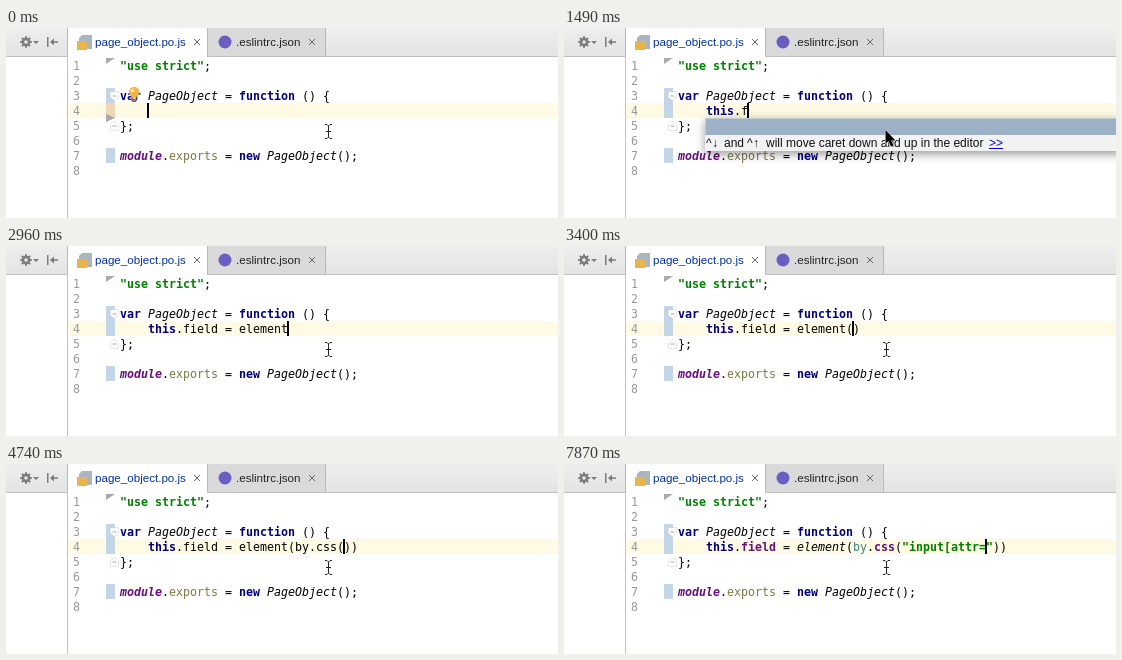
These frames come from a looping animation (552 by 190 pixels, 8000 ms). An HTML page with a canvas:

```html
<!DOCTYPE html>
<html lang="en">
<head>
<meta charset="utf-8">
<title>Editor typing</title>
<style>
html, body { margin: 0; width: 552px; height: 190px; overflow: hidden; background: #fff; }
canvas { display: block; }
</style>
</head>
<body>
<canvas id="stage" width="552" height="190"></canvas>
<script>
const ctx = document.getElementById('stage').getContext('2d');
const LOOP = 8000, CELL = 7, LINE = 15, LEFT = 114, TOP = 30, INDENT = 142;
const MONO = '11.63px "DejaVu Sans Mono", monospace';
const ui = size => size + 'px "Liberation Sans", Arial, sans-serif';

const STYLES = {
  plain: ['', '#000'],
  keyword: ['bold ', '#000080'],
  string: ['bold ', '#008000'],
  italic: ['italic ', '#000'],
  global: ['italic bold ', '#660e7a'],
  member: ['bold ', '#660e7a'],
  olive: ['', '#7a7a43'],
  teal: ['', '#458383']
};

// time, text before the caret, text after it, popup
const STEPS = [
  [0, '', ''],
  [750, 't', ''],
  [900, 'th', '', 'word'],
  [1050, 'thi', '', 'word'],
  [1190, 'this', '', 'word'],
  [1340, 'this.', '', 'empty'],
  [1490, 'this.f', '', 'empty'],
  [1640, 'this.fi', '', 'empty'],
  [1780, 'this.fiel', '', 'empty'],
  [1920, 'this.field', ''],
  [2070, 'this.field ', ''],
  [2220, 'this.field =', ''],
  [2370, 'this.field = ', ''],
  [2520, 'this.field = e', ''],
  [2660, 'this.field = ele', ''],
  [2810, 'this.field = eleme', ''],
  [2960, 'this.field = element', ''],
  [3260, 'this.field = element', '', 'globals'],
  [3400, 'this.field = element(', ')'],
  [3700, 'this.field = element(b', ')'],
  [3850, 'this.field = element(by', ')'],
  [4000, 'this.field = element(by.', ')', 'members'],
  [4150, 'this.field = element(by.c', ')', 'members'],
  [4450, 'this.field = element(by.cs', ')', 'members'],
  [4600, 'this.field = element(by.css', ')', 'members'],
  [4740, 'this.field = element(by.css(', '))']
];
const QUOTED = [
  [5040, ''], [5340, 'i'], [5490, 'in'], [5640, 'inp'], [5940, 'input'],
  [6390, 'input['], [7130, 'input[a'], [7430, 'input[at'], [7580, 'input[att'],
  [7730, 'input[attr'], [7870, 'input[attr=']
];
for (const [time, value] of QUOTED) {
  STEPS.push([time, 'this.field = element(by.css("' + value, '"))']);
}

const MEMBERS = [
  ['m', 'cssContainingText', '(cssSelector: string, searchText: string)', true],
  ['f', 'className', '(className: string)'],
  ['m', 'constructor', '() (WebdriverBy)'],
  ['f', 'css', '(css: string)'],
  ['m', 'deepCss', '(selector: string)', true],
  ['m', 'addLocator', '(name: string, script: Function)', true]
];
const GLOBALS = [
  ['f', 'element', ''], ['f', 'ElementFinder', ''], ['f', 'ElementArrayFinder', ''],
  ['f', 'Element', ''], ['f', 'elementExplorer', ''], ['f', 'ElementHelper', '']
];

function rect(x, y, w, h, color) {
  ctx.fillStyle = color;
  ctx.fillRect(x, y, w, h);
}

function text(value, x, y, font, color) {
  ctx.font = font;
  ctx.fillStyle = color;
  ctx.fillText(value, x, y);
  return x + ctx.measureText(value).width;
}

function shape(points, fill, stroke, closed = true) {
  ctx.beginPath();
  points.forEach(([x, y]) => ctx.lineTo(x, y));
  if (closed) ctx.closePath();
  if (stroke) { ctx.strokeStyle = stroke; ctx.lineWidth = 1; ctx.stroke(); }
  if (fill) { ctx.fillStyle = fill; ctx.fill(); }
}

function disc(x, y, r, color) {
  ctx.beginPath();
  ctx.arc(x, y, r, 0, Math.PI * 2);
  ctx.fillStyle = color;
  ctx.fill();
}

function code(line, x, tokens) {
  const y = TOP + (line - 1) * LINE + 12;
  for (const [value, style] of tokens) {
    const [weight, color] = STYLES[style || 'plain'];
    text(value, x, y, weight + MONO, color);
    x += value.length * CELL;
  }
}

function tokenize(value, resolved) {
  const kinds = { this: 'keyword' };
  if (resolved) Object.assign(kinds, { field: 'member', element: 'italic', by: 'teal', css: 'member' });
  const parts = value.match(/this|field|element|by|css|".*?"|./g) || [];
  return parts.map(part => [part, part[0] === '"' ? 'string' : kinds[part]]);
}

function cross(x, y) {
  shape([[x - 3, y - 3], [x + 3, y + 3]], null, '#666', false);
  shape([[x + 3, y - 3], [x - 3, y + 3]], null, '#666', false);
}

function toolbar() {
  const shade = ctx.createLinearGradient(0, 0, 0, 27);
  shade.addColorStop(0, '#eeeeee');
  shade.addColorStop(1, '#e4e4e4');
  rect(0, 0, 552, 28, shade);

  const grey = '#7c7c7c';
  for (let i = 0; i < 8; i++) {
    const a = i * Math.PI / 4;
    ctx.strokeStyle = grey;
    ctx.lineWidth = 2;
    ctx.beginPath();
    ctx.moveTo(20 + 3 * Math.cos(a), 14 + 3 * Math.sin(a));
    ctx.lineTo(20 + 5.8 * Math.cos(a), 14 + 5.8 * Math.sin(a));
    ctx.stroke();
  }
  disc(20, 14, 4.3, grey);
  disc(20, 14, 1.8, '#e9e9e9');
  shape([[27, 13], [33, 13], [30, 16]], grey);
  rect(41, 9, 1.5, 10, grey);
  rect(46, 13.3, 6, 1.5, grey);
  shape([[44, 14], [48, 10.5], [48, 17.5]], grey);

  rect(61, 0, 140, 28, '#fff');
  rect(201, 0, 118, 28, '#dadada');
  for (const x of [61, 201, 319]) rect(x, 0, 1, 28, '#b8b8b8');
  rect(0, 28, 62, 1, '#c0c0c0');
  rect(201, 28, 351, 1, '#c0c0c0');

  shape([[76, 7], [86, 7], [86, 21], [73, 21], [73, 10]], '#a9b5bf');
  rect(71, 13, 10, 9, '#e8b44c');
  text('page_object.po.js', 89, 18, ui(11.6), '#0032a0');
  cross(191, 14);
  disc(219, 14, 6.5, '#6a5fc0');
  text('.eslintrc.json', 230, 18, ui(11.6), '#222');
  cross(306, 14);
}

function fold(y, up) {
  const d = up ? -1 : 1;
  shape([[104.5, y - 4 * d], [112.5, y - 4 * d], [112.5, y + d], [108.5, y + 4.5 * d], [104.5, y + d]],
    '#fff', '#ccc');
  rect(106.5, y - 0.5, 4, 1, '#aaa');
}

function editor(fresh) {
  rect(61, 28, 1, 162, '#c4c4c4');
  rect(62, 75, 490, LINE, '#fffae3');
  for (let n = 1; n <= 8; n++) text(n, 67, TOP + n * LINE - 3, MONO, '#999');
  rect(100, 60, 9, LINE, '#c3d6e8');
  rect(100, 75, 9, LINE, fresh ? '#f0d6b6' : '#c3d6e8');
  rect(100, 120, 9, LINE, '#c3d6e8');
  shape([[100, 30], [109, 30], [100, 36]], '#aaa');
  if (fresh) shape([[100, 86], [109, 90], [100, 94]], '#aaa');
  fold(68, false);
  fold(98, true);

  code(1, LEFT, [['"use strict"', 'string'], [';']]);
  code(3, LEFT, [['var', 'keyword'], [' '], ['PageObject', 'italic'], [' = '],
    ['function', 'keyword'], [' () {']]);
  code(5, LEFT, [['};']]);
  code(7, LEFT, [['module', 'global'], ['.'], ['exports', 'olive'], [' = '],
    ['new', 'keyword'], [' '], ['PageObject', 'italic'], ['();']]);
}

function bulb() {
  disc(128, 64, 5.2, '#f2b544');
  disc(126.5, 62.5, 2, '#fbdc98');
  rect(125.5, 68, 5, 2.5, '#f2b544');
  rect(125.5, 71, 5, 3, '#777');
}

function panel(x, height, color) {
  ctx.save();
  ctx.shadowColor = 'rgba(0,0,0,.4)';
  ctx.shadowBlur = 9;
  ctx.shadowOffsetY = 3;
  rect(x, 90, 560 - x, height, color);
  ctx.restore();
  rect(x, 90, 552 - x, 18, '#9cb1c6');
  rect(x, 90, 552 - x, 1, '#c3cbd3');
  rect(x, 90, 1, height, '#c3cbd3');
}

function hintPopup(x, typed) {
  panel(x, 33, '#f2f2f2');
  rect(x, 107, 552 - x, 16, '#f2f2f2');
  if (typed) {
    text('this', INDENT, 103, 'bold ' + MONO, '#75808c');
    text(typed, INDENT, 103, 'bold ' + MONO, '#c45ed4');
  }
  const font = ui(12);
  const piece = (value, dx) => text(value, x + dx, 119, font, '#111');
  piece('^', 1);
  piece('↓', 7);
  piece('and', 19);
  piece('^', 42);
  piece('↑', 48);
  piece('will move caret down and up in the editor', 61);
  const end = text('>>', x + 284, 119, font, '#0000e0');
  rect(x + 284, 120, end - x - 284, 1, '#0000e0');
}

function lock(x, y) {
  ctx.strokeStyle = '#9cc89c';
  ctx.lineWidth = 1;
  ctx.beginPath();
  ctx.arc(x - 1, y - 1, 2, Math.PI, 0);
  ctx.stroke();
  rect(x - 1, y - 0.5, 5, 4, '#9cc89c');
}

// A prefix may match the start of a name or one of its capitalised words.
function matchAt(name, prefix) {
  if (name.startsWith(prefix)) return 0;
  return name.indexOf(prefix[0].toUpperCase() + prefix.slice(1));
}

function listPopup(x, textX, rows, prefix, locks) {
  panel(x, Math.min(rows.length * 18, 110), '#ebf4fe');
  rows.forEach(([kind, name, params, bold], i) => {
    const y = 99 + i * 18;
    const font = (bold ? 'bold ' : '') + MONO;
    ctx.globalAlpha = i ? 1 : 0.7;
    disc(x + 10, y, 6.3, kind === 'm' ? '#f0b6c2' : '#f7d79c');
    text(kind, x + 6.5, y + 3.5, MONO, '#9a7070');
    if (locks) lock(x + 25, y);
    ctx.globalAlpha = 1;
    text(name, textX, y + 4, font, bold ? '#484c50' : '#5c5c5c');
    const at = prefix ? matchAt(name, prefix) : -1;
    if (at >= 0) {
      text(name.substr(at, prefix.length), textX + at * CELL, y + 4, font, '#c85cd0');
    }
    text(params, textX + name.length * CELL, y + 4, MONO, '#666');
  });
}

function popup(kind, typed) {
  if (kind === 'word') hintPopup(134, typed);
  if (kind === 'empty') hintPopup(141, '');
  if (kind === 'globals') listPopup(215, 233, GLOBALS, 'element', false);
  if (kind === 'members') {
    const prefix = typed.split('by.')[1];
    const rows = MEMBERS.filter(row => row[1].toLowerCase().includes(prefix));
    listPopup(274, 310, rows, prefix, true);
  }
}

function pointer(arrow) {
  if (arrow) {
    shape([[321.5, 102], [321.5, 116], [324.5, 113], [327, 118.5], [329.5, 117.5],
      [327, 112.5], [331.5, 112.5]], '#000', '#fff');
    return;
  }
  rect(322, 98, 1, 11, '#222');
  rect(320, 103, 5, 1, '#222');
  for (const [y, d] of [[96.5, 1.5], [110.5, -1.5]]) {
    shape([[319, y], [321, y], [322.5, y + d], [324, y], [326, y]], null, '#222', false);
  }
}

function draw(t) {
  const [time, before, after, kind] = STEPS.filter(step => step[0] <= t).pop();
  const fresh = time === 0;
  rect(0, 0, 552, 190, '#fff');
  toolbar();
  editor(fresh);
  if (fresh) bulb();
  code(4, INDENT, tokenize(before + after, t >= 6390));
  if (t < 300 || t >= 750) rect(INDENT - 1 + before.length * CELL, 75, 2, LINE, '#000');
  if (kind) popup(kind, before);
  pointer(Boolean(kind));
}

function frame() {
  draw(performance.now() % LOOP);
  requestAnimationFrame(frame);
}
frame();
</script>
</body>
</html>
```
